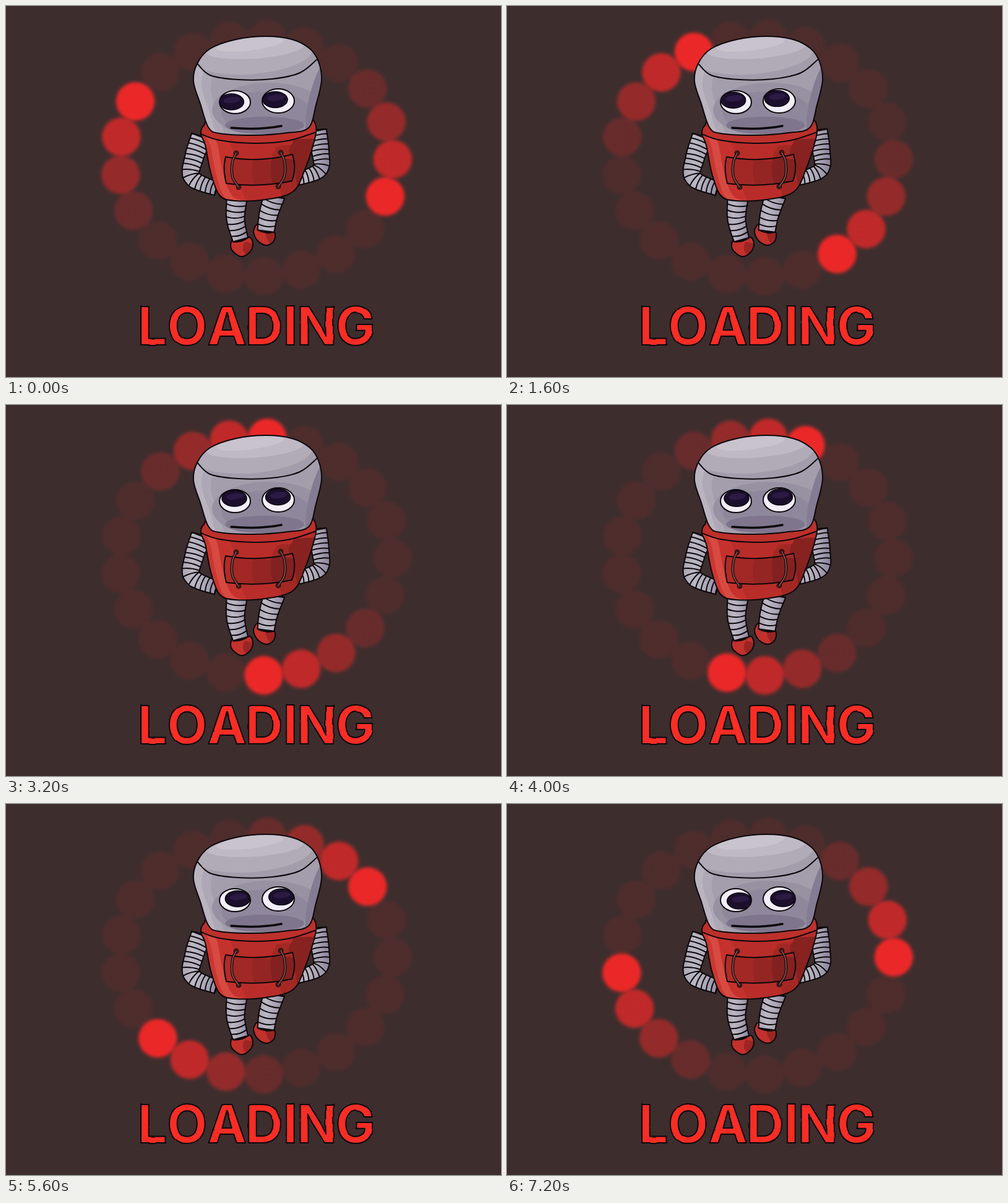
An HTML page that plays this animation: 800 by 600 pixels, repeating every 8 s.

```html
<!DOCTYPE html>
<html lang="en">
<head>
<meta charset="utf-8">
<title>Loading</title>
<style>
html, body { margin: 0; width: 100%; height: 100%; overflow: hidden; background: #3d2d2d; }
svg { display: block; width: 800px; height: 600px; }
.line { fill: none; stroke: #0c070b; stroke-width: 2; stroke-linecap: round; stroke-linejoin: round; }
.word { font: 700 85px Inter, "Liberation Sans", sans-serif; fill: #f82d25; stroke: #0c070b; stroke-width: 2; stroke-linejoin: round; }
</style>
</head>
<body>
<svg viewBox="0 0 800 600">
  <defs>
    <radialGradient id="glow">
      <stop offset=".7" stop-color="#eb2828"/>
      <stop offset=".77" stop-color="#eb2828" stop-opacity=".85"/>
      <stop offset=".84" stop-color="#eb2828" stop-opacity=".5"/>
      <stop offset=".91" stop-color="#eb2828" stop-opacity=".15"/>
      <stop offset="1" stop-color="#eb2828" stop-opacity="0"/>
    </radialGradient>
    <linearGradient id="metal">
      <stop offset="0" stop-color="#a9a5b2"/>
      <stop offset=".3" stop-color="#bbb8c4"/>
      <stop offset=".65" stop-color="#aaa6b5"/>
      <stop offset="1" stop-color="#8a839b"/>
    </linearGradient>
    <filter id="wobble" x="-5%" y="-10%" width="110%" height="120%" color-interpolation-filters="sRGB">
      <feTurbulence type="fractalNoise" baseFrequency=".04" seed="4"/>
      <feDisplacementMap in="SourceGraphic" scale="3" xChannelSelector="R" yChannelSelector="G"/>
    </filter>
  </defs>
  <rect width="800" height="600" fill="#3d2d2d"/>
  <g id="ring"></g>
  <g id="robot"></g>
  <text class="word" y="548" x="212.500 260 325.500 386.500 447.500 470 532.500" filter="url(#wobble)">LOADING</text>
</svg>
<script>
const STEP = 800, STEPS = 10, DOTS = 21;
const ring = document.getElementById("ring"), robot = document.getElementById("robot");
const defs = document.querySelector("defs");

function add(parent, tag, attrs) {
  const el = document.createElementNS("http://www.w3.org/2000/svg", tag);
  for (const k in attrs) el.setAttribute(k, attrs[k]);
  return parent.appendChild(el);
}

// smooth curve through points
function curve(pts, closed) {
  const n = pts.length;
  const get = i => pts[closed ? (i + n) % n : Math.min(n - 1, Math.max(0, i))];
  const lean = (p, a, b, f) => p.map((v, k) => v + (b[k] - a[k]) * f);
  let d = "M" + pts[0];
  for (let i = 0; i < (closed ? n : n - 1); i++) {
    const a = get(i), b = get(i + 1);
    d += `C${lean(a, get(i - 1), b, 1 / 6)} ${lean(b, a, get(i + 2), -1 / 6)} ${b}`;
  }
  return d + (closed ? "Z" : "");
}

const ink = d => add(robot, "path", { d, class: "line" });

function clipped(d) {
  const id = "clip" + defs.children.length;
  add(add(defs, "clipPath", { id }), "path", { d });
  return add(robot, "g", { "clip-path": `url(#${id})` });
}

// light falls from the left: every shade is the same shape, moved
function shaded(d, shades) {
  const g = clipped(d);
  for (const [dx, dy, fill] of shades)
    add(g, "path", { d, fill, transform: `translate(${dx} ${dy})` });
  return g;
}

const oval = (g, cx, cy, rx, ry, fill, turn = 0) =>
  add(g, "ellipse", { cx, cy, rx, ry, fill, transform: `rotate(${turn} ${cx} ${cy})` });

// ribbed tube around a centre line, narrowing from w0 to w1
function limb(mid, w0, w1, count, bow) {
  const probe = add(defs, "path", { d: curve(mid) }), len = probe.getTotalLength();
  const edge = (u, side) => {
    const p = probe.getPointAtLength(u * len);
    const a = probe.getPointAtLength(u * len - 2), b = probe.getPointAtLength(u * len + 2);
    const t = Math.atan2(b.y - a.y, b.x - a.x), w = side * (w0 + (w1 - w0) * u);
    return [p.x - Math.sin(t) * w, p.y + Math.cos(t) * w, t];
  };
  const left = [], right = [];
  let ribs = "";
  for (let i = 0; i <= count; i++) {
    const p = edge(i / count, 1), q = edge(i / count, -1), t = p[2];
    left.push(p.slice(0, 2));
    right.unshift(q.slice(0, 2));
    ribs += `M${p[0]} ${p[1]}Q${(p[0] + q[0]) / 2 + Math.cos(t) * bow} ${(p[1] + q[1]) / 2 + Math.sin(t) * bow} ${q[0]} ${q[1]}`;
  }
  const skin = curve(left) + curve(right).replace("M", "L") + "Z";
  add(robot, "path", { d: skin, fill: "url(#metal)" });
  ink(skin);
  ink(ribs);
}

function foot(pts) {
  const d = curve(pts, true);
  shaded(d, [[0, 0, "#c2312c"], [20, 4, "#9c2523"]]);
  ink(d);
}

function handle(x, y, bend) {
  const x2 = x + (bend < 0 ? 4 : -4), y2 = y + 55;
  for (const [cx, cy] of [[x, y], [x2, y2]])
    add(robot, "circle", { cx, cy, r: 3.6, fill: "#8b3936", stroke: "#180a0b", "stroke-width": 1.5 });
  const d = curve([[x, y], [x + bend, y + 14], [x + bend, y + 38], [x2, y2]]);
  for (const [stroke, w] of [["#180a0b", 4.4], ["#86504d", 1.8]])
    add(robot, "path", { d, fill: "none", stroke, "stroke-width": w, "stroke-linecap": "round" });
}

function eye(cx, cy, rx, ry) {
  const d = `M${cx - rx} ${cy}a${rx} ${ry} 0 1 1 ${2 * rx} 0a${rx} ${ry} 0 1 1 ${-2 * rx} 0Z`;
  const pupil = add(shaded(d, [[0, 0, "#f2eefb"]]), "g", {});
  add(pupil, "ellipse", { rx: 20, ry: 13, fill: "#1c0f2d", stroke: "#0a0610", "stroke-width": 1.6 });
  oval(pupil, 1, -3, 14, 5, "#2b1a42", -6);
  ink(d);
  return pupil;
}

foot([[366, 378], [364, 393], [379, 405], [393, 399], [399, 386], [394, 374], [380, 380]]);
foot([[407, 353], [400, 365], [407, 380], [421, 387], [433, 380], [434, 366], [420, 366]]);
limb([[373, 312], [371, 345], [379, 378]], 16.5, 12.5, 7, 5);
limb([[434, 306], [424, 338], [420, 364]], 17, 13.5, 6, 5);
limb([[316, 212], [304, 245], [301, 278], [341, 296]], 17, 11, 14, -3);
limb([[502, 202], [508, 235], [507, 265], [471, 280]], 16, 10, 13, -3);

const body = curve([[315, 207], [320, 193], [340, 185], [480, 185], [494, 183], [501, 195], [499, 215],
  [484, 262], [464, 300], [420, 313], [370, 315], [345, 306], [331, 270], [322, 225]], true);
const collar = curve([[315, 207], [345, 217], [400, 222], [455, 218], [501, 204]]);
const torso = shaded(body, [[0, 0, "#cb3630"], [9, 4, "#d64a42"], [20, 0, "#c5322d"],
  [45, 10, "#b82d29"], [115, 40, "#a32824"], [142, 30, "#882220"]]);
add(torso, "path", { d: collar + "V170H310Z", fill: "#bd302b" });
ink(collar);
ink(body);

const pocket = "M355 244Q410 254 463 240Q470 262 462 283Q410 294 356 287Q350 262 355 244Z";
shaded(pocket, [[0, 0, "#b02c28"], [12, 0, "#a22825"], [45, 4, "#942523"], [75, 0, "#822120"]]);
ink(pocket);
handle(372, 238, -6);
handle(444, 237, 6);

const head = curve([[309, 93], [330, 69], [372, 54], [420, 49], [462, 54], [491, 69], [505, 90], [510, 120],
  [501, 160], [489, 197], [455, 205], [400, 209], [345, 206], [327, 196], [314, 158], [303, 122]], true);
const seam = curve([[309, 93], [330, 112], [375, 119], [430, 118], [475, 108], [503, 86]]);
const face = shaded(head, [[0, 0, "#bab4c1"], [13, 8, "#aea8b6"], [28, 14, "#a49eac"]]);
oval(face, 425, 168, 92, 44, "#9891a2");
oval(face, 420, 172, 72, 34, "#8f879b");
oval(face, 508, 150, 18, 70, "#847c92", 14);
oval(face, 418, 193, 64, 14, "#7f768d");
const lid = add(face, "g", {});
add(lid, "path", { d: seam + "V40H300Z", fill: "#a39dab" });
oval(lid, 398, 78, 98, 32, "#b1abb8", -5);
oval(lid, 402, 68, 80, 17, "#bfb9c5", -4);
oval(lid, 394, 62, 55, 10, "#c9c3ce", -7);
ink(seam);
ink(head);
ink("M364 197Q408 201 445 194").style.strokeWidth = 3.6;
const pupils = [eye(370, 155.5, 25, 18.5), eye(440, 153.5, 26, 19.5)];

const dots = Array.from({ length: DOTS }, (_, i) => {
  const a = 3.604 + i * 2 * Math.PI / DOTS, b = a + 0.035 * Math.sin(2 * a);
  return add(ring, "circle", { cx: 404 + 221 * Math.cos(b), cy: 245 + 192.5 * Math.sin(b), r: 37, fill: "url(#glow)" });
});

function draw(ms) {
  const s = Math.floor(ms / STEP) % STEPS, a = Math.PI * s / (STEPS - 1);
  dots.forEach((dot, i) => {
    const lag = Math.min(...[s, s + STEPS].map(h => (h - i + DOTS) % DOTS));
    dot.setAttribute("opacity", Math.max(0.1, 1 - lag / 4));
  });
  const look = (k, x, y) => pupils[k].setAttribute("transform", `translate(${x} ${y})`);
  look(0, 370 - 5.7 * Math.cos(a), 155 + 0.2 * s - 5 * Math.sin(a));
  look(1, 440.5 - 5.5 * Math.cos(a), 151.5 + 0.15 * s - 3.5 * Math.sin(a));
}

const start = performance.now();
function tick() {
  draw(performance.now() - start);
  requestAnimationFrame(tick);
}
tick();
</script>
</body>
</html>
```
